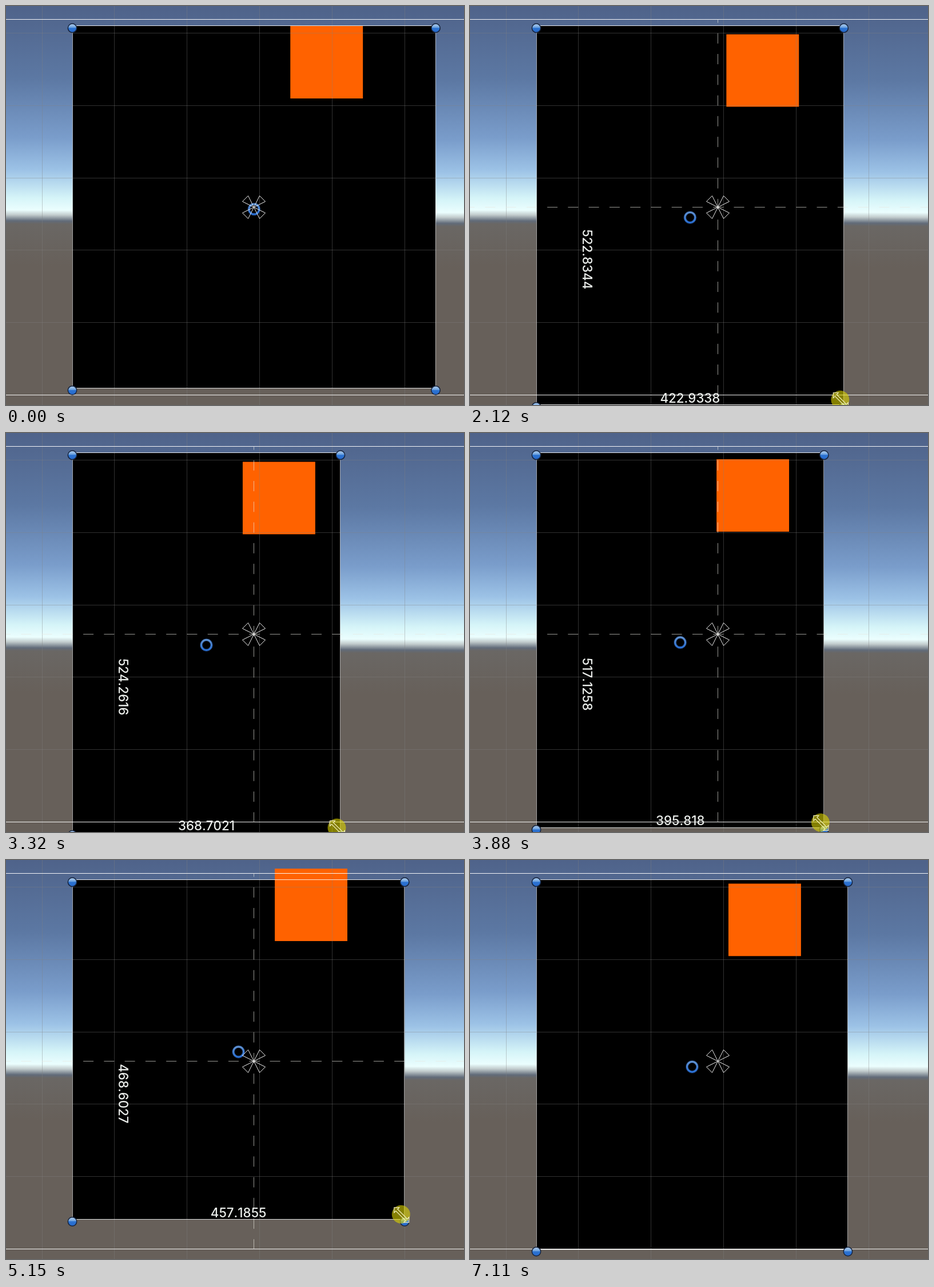
These frames come from a looping animation (801x699 px, 7250 ms). An HTML page:

```html
<!DOCTYPE html>
<html lang="en">
<head>
<meta charset="utf-8">
<title>Resizing a panel with a pinned child</title>
<style>
  html, body { margin: 0; width: 100%; height: 100%; overflow: hidden; background: #675f59; }
  svg { display: block; width: 801px; height: 699px; }
  text { font: 500 22.3px Inter, Roboto, sans-serif; font-kerning: none; fill: #e9ece9; text-anchor: middle; }
</style>
</head>
<body>
<svg viewBox="0 0 801 699">
  <defs>
    <linearGradient id="sky" gradientUnits="userSpaceOnUse" x1="0" y1="0" x2="-4.2" y2="699">
      <stop offset="0" stop-color="#4f638a"/>
      <stop offset=".18" stop-color="#5c78a3"/>
      <stop offset=".33" stop-color="#7a9dcb"/>
      <stop offset=".41" stop-color="#9cc2e6"/>
      <stop offset=".48" stop-color="#d5f4f8"/>
      <stop offset=".511" stop-color="#ebfefe"/>
      <stop offset=".523" stop-color="#c2cccd"/>
      <stop offset=".538" stop-color="#616b79"/>
      <stop offset=".546" stop-color="#6a6764"/>
      <stop offset=".65" stop-color="#67605a"/>
    </linearGradient>
    <linearGradient id="knob" x1="0" y1="0" x2="0" y2="1">
      <stop offset="0" stop-color="#b4d0ee"/>
      <stop offset=".42" stop-color="#6ea3e0"/>
      <stop offset=".5" stop-color="#2d74d2"/>
      <stop offset="1" stop-color="#2568cc"/>
    </linearGradient>
    <linearGradient id="ringBlue" x1="0" y1="0" x2="0" y2="1">
      <stop offset="0" stop-color="#5f92d2"/>
      <stop offset="1" stop-color="#2a70d4"/>
    </linearGradient>
    <circle id="handle" r="7.7" fill="url(#knob)" stroke="#16233c" stroke-width="1.5"/>
  </defs>
  <rect width="801" height="699" fill="url(#sky)"/>
  <rect id="panel" x="116.5" y="35"/>
  <rect id="child" width="126.9" height="126.9" fill="#ff6200"/>
  <path id="grid" stroke="#808080" stroke-opacity=".38" fill="none"/>
  <path d="M0 23.5H801M0 681.5H801" stroke="#fff" stroke-opacity=".93"/>
  <path id="sides" stroke="#fff" stroke-opacity=".55" fill="none"/>
  <path id="edges" stroke="#fff" stroke-opacity=".85" fill="none"/>
  <g id="guides">
    <g stroke="#e8e8e0" stroke-opacity=".65" stroke-dasharray="18 18.27">
      <path d="M433.5 23V682" stroke-dashoffset="11.5"/>
      <path d="M0 352.5H801" stroke-dashoffset="10"/>
    </g>
    <text id="widthLabel"></text>
    <text id="heightLabel"></text>
  </g>
  <g id="ring" fill="none">
    <circle r="9" stroke="#10203c" stroke-width="5"/>
    <circle r="9" stroke="url(#ringBlue)" stroke-width="3.2"/>
  </g>
  <path id="anchors" transform="translate(433.5 352.5)" fill="none" stroke="#fff" stroke-opacity=".9"/>
  <g id="handles">
    <use href="#handle"/><use href="#handle"/><use href="#handle"/><use href="#handle"/>
  </g>
  <g id="cursor">
    <circle r="16" fill="#dcd400" fill-opacity=".6"/>
    <path transform="translate(1 1)" d="M-13-13h9l-3 3L10 7l3-3v9H4l3-3L-10-7l-3 3z"
      fill="none" stroke="#f4f1c0" stroke-width="1.2"/>
  </g>
</svg>
<script>
const LOOP = 7250, FRAME = 70, DRAG_START = 130, RELEASE = 6750, CURSOR_GONE = 7110;
const SCALE = 1.2693, STEP = 1.427151, LEFT = 116.5, TOP = 35, CELL = 126.9;
const DIP = 45;

// The drag's turning points, in pointer steps away from 500 x 500.
// On the way to the next one the width bulges and the height dips.
const turns = [
  { t: DRAG_START, w: 0, h: 0 },
  { t: 460, w: -3, h: 20 },
  { t: 950, w: -38, h: -34 },
  { t: 1220, w: -46, h: -21, bulge: 62 },
  { t: 2120, w: -54, h: 16, dips: 1 },
  { t: 3320, w: -92, h: 17, bulge: 20, dips: 2 },
  { t: 4360, w: -93, h: 12, bulge: 65, dips: 1 },
  { t: 5500, w: -72, h: 10 },
  { t: 5850, w: -91, h: -58 },
  { t: 6550, w: -50, h: 7 }
];

const $ = id => document.getElementById(id);
const set = (el, attrs) => {
  for (const name in attrs) el.setAttribute(name, attrs[name]);
};
const move = (el, x, y) => set(el, { transform: `translate(${x} ${y})` });
const snap = v => Math.floor(v) + .5;
const clamp = v => Math.min(1, Math.max(0, v));
const lerp = (a, b, u) => a + (b - a) * u;
const hump = (u, count = 1) => Math.sin(Math.PI * count * u) ** 2;

let gridPath = '';
for (let i = 0; i < 6; i++) {
  gridPath += `M${snap(63 + i * CELL)} 0V699M0 ${snap(47.2 + i * CELL)}H801`;
}
set($('grid'), { d: gridPath });

set($('anchors'), {
  d: [[-1, -1], [1, -1], [1, 1], [-1, 1]].map(([x, y]) =>
    `M0 0L${10 * x} ${20 * y}L${20 * x} ${10 * y}Z`).join('')
});

// Panel size in units; advances in whole frames and whole pointer steps.
function sizeAt(time) {
  const next = turns.findIndex(turn => turn.t > time);
  const to = turns.at(next), from = next > 0 ? turns[next - 1] : to;
  const elapsed = Math.floor((time - from.t) / FRAME) * FRAME;
  const u = from === to ? 0 : elapsed / (to.t - from.t);
  const eased = u * u * (3 - 2 * u);
  const w = lerp(from.w, to.w, eased) + (from.bulge || 0) * hump(u);
  const h = lerp(from.h, to.h, eased) - DIP * hump(u, from.dips || 0);
  return [w, h].map(steps => 500 + Math.round(steps) * STEP);
}

function draw(time) {
  const [width, height] = sizeAt(time);
  const w = width * SCALE, h = height * SCALE;
  const right = LEFT + w, bottom = TOP + h;
  const cx = LEFT + w / 2, cy = TOP + h / 2;

  set($('panel'), { width: w, height: h });
  set($('child'), { x: cx + CELL / 2, y: cy - 2.5 * CELL });
  set($('sides'), { d: `M${LEFT} ${TOP}V${bottom}M${snap(right)} ${TOP}V${bottom}` });
  set($('edges'), { d: `M${LEFT} ${TOP - .5}H${right}M${LEFT} ${snap(bottom)}H${right}` });
  move($('ring'), cx, cy + 3.7);

  [...$('handles').children].forEach((handle, i) =>
    move(handle, i % 2 ? right + .4 : LEFT - .5, (i < 2 ? TOP : bottom) + 3.7));

  const dragging = time >= DRAG_START && time < RELEASE;
  set($('guides'), { visibility: dragging ? 'visible' : 'hidden' });
  $('widthLabel').textContent = +width.toFixed(4);
  move($('widthLabel'), cx, bottom - 4);
  $('heightLabel').textContent = +height.toFixed(4);
  set($('heightLabel'), { transform: `translate(197 ${cy + 77}) rotate(90)` });

  const fade = clamp((time - RELEASE) / (CURSOR_GONE - RELEASE));
  set($('cursor'), { opacity: time < DRAG_START ? 0 : 1 - fade });
  move($('cursor'), right - 6, bottom - 9);
}

const start = performance.now();
function tick() {
  draw((performance.now() - start) % LOOP);
  requestAnimationFrame(tick);
}
tick();
</script>
</body>
</html>
```
